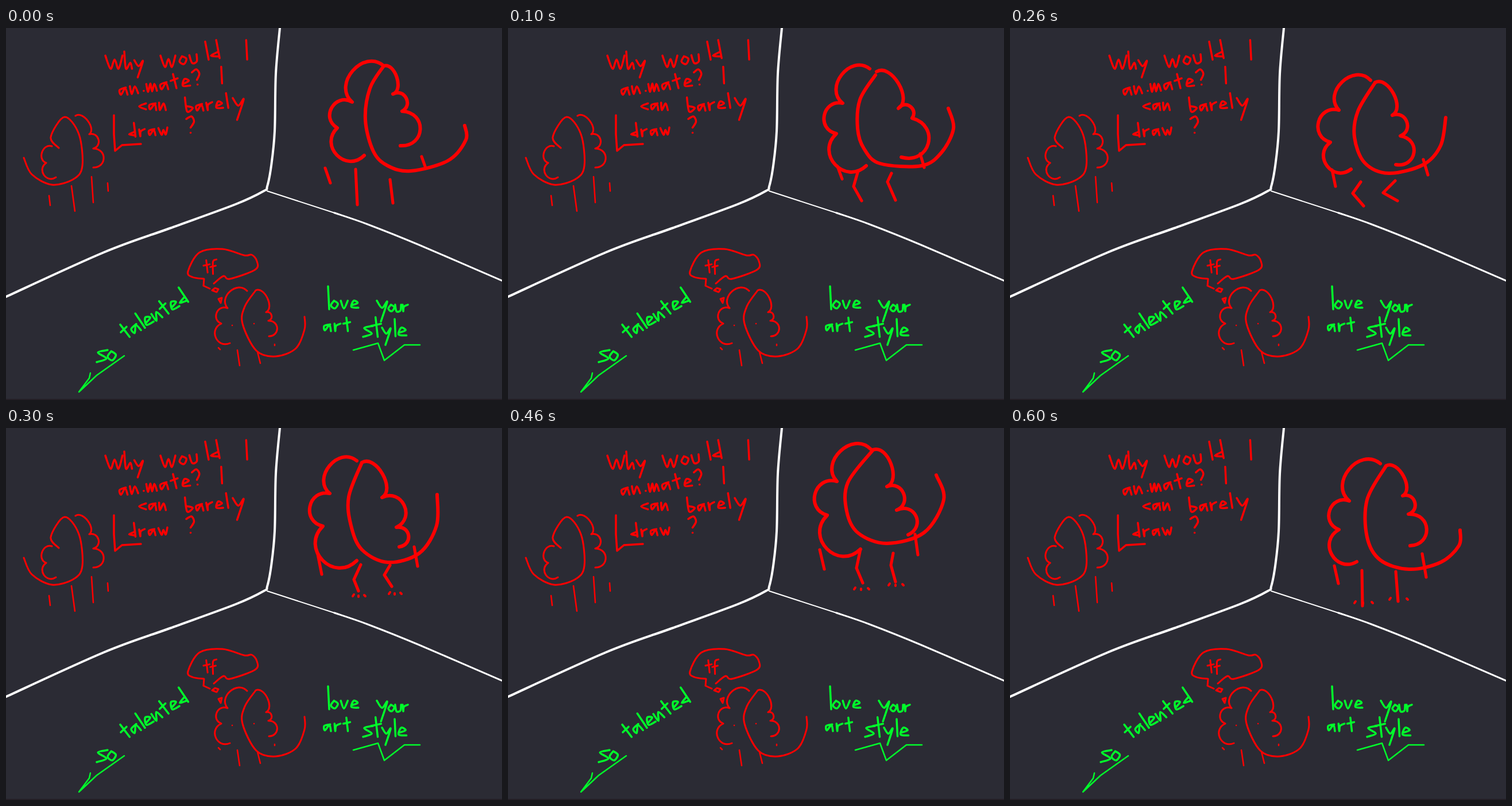
An HTML page for the animation above (0.7 s loop, 864 by 648 pixels).

```html
<!DOCTYPE html>
<html lang="en">
<head>
<meta charset="utf-8">
<title>Why would I animate?</title>
<style>
  html, body { margin: 0; width: 100%; height: 100%; overflow: hidden; background: #2b2b34; }
  svg { display: block; width: 100vw; height: 100vh; }
  path { fill: none; stroke-linecap: round; stroke-linejoin: round; }
</style>
</head>
<body>
<svg id="stage" viewBox="0 0 864 648" role="img"
  aria-label="Why would I animate? I can barely draw? tf. so talented. love your art style"></svg>
<script>
const RED = '#ff0000', GREEN = '#00ff2b', WHITE = '#ffffff';
const STEP = 100;
const stage = document.getElementById('stage');

function add(parent, tag, attrs = {}) {
  const el = document.createElementNS('http://www.w3.org/2000/svg', tag);
  for (const key in attrs) el.setAttribute(key, attrs[key]);
  return parent.appendChild(el);
}

const ink = (color, width, d, parent = stage) =>
  add(parent, 'path', { d, stroke: color, 'stroke-width': width });

const points = text => text.trim().split(/\s+/).map(s => s.split(',').map(Number));

// Smooth curve through all points
function curve(text) {
  const p = points(text);
  if (p.length === 1) return `M${p[0]}h.1`;
  return p.slice(1).reduce((d, b, i) => {
    const a = p[i], before = p[i - 1] || a, after = p[i + 2] || b;
    const c1 = a.map((v, k) => v + (b[k] - before[k]) / 6);
    const c2 = b.map((v, k) => v - (after[k] - a[k]) / 6);
    return d + `C${c1} ${c2} ${b}`;
  }, `M${p[0]}`);
}

// Row of round bumps between cusps; the sign of a bulge picks the side
function bumps(text, bulges) {
  const p = points(text);
  return p.slice(1).reduce((d, b, i) => {
    const a = p[i], k = bulges[i] * 4 / 3;
    const nx = (b[1] - a[1]) * k, ny = (a[0] - b[0]) * k;
    return d + `C${a[0] + nx},${a[1] + ny} ${b[0] + nx},${b[1] + ny} ${b}`;
  }, `M${p[0]}`);
}

// Hand lettering: x-height runs from 0 to 10
const small = {
  a: '9,1 1,3 2,9 8,2 10,10', c: '9,1 0,5 9,9', e: '1,6 9,3 4,0 1,8 10,9', i: '3,8',
  m: '0,0 1,10 5,0 6,10 10,1 12,10', n: '0,0 1,10 6,1 9,10', o: '4,0 0,6 5,10 9,4 4,0',
  r: '1,0 2,10 3,3 9,0', s: '9,0 1,2 8,7 0,10', u: '0,0 2,10 8,9 9,0', v: '0,0 4,10 9,0',
  w: '0,0 4,10 7,3 10,10 13,0'
};
const tall = {
  b: '0,-10 1,9 9,5 2,2', d: '8,3 0,6 8,8 / 8,-10 9,10', f: '9,-9 4,-6 4,12 / 0,2 8,0',
  h: '0,-10 2,10 7,3 9,10', l: '2,-10 3,10', t: '4,-8 6,10 / 0,0 9,-2',
  y: '0,0 5,7 10,1 4,20', '?': '0,-7 6,-10 9,-4 5,3 / 5,9'
};
const glyphs = { ...small, ...tall };

function write(color, width, text, x, y, size, gap = 0, angle = 0) {
  const g = add(stage, 'g', { transform: `translate(${x} ${y}) rotate(${angle}) scale(${size})` });
  let pen = 0;
  for (const ch of text) {
    const strokes = glyphs[ch].split('/');
    const path = ink(color, width / size, strokes.map(curve).join(''), g);
    path.setAttribute('transform', `translate(${pen} 0)`);
    pen += Math.max(...strokes.flatMap(points).map(p => p[0])) + gap / size;
  }
}
const red = (...args) => write(RED, 3.5, ...args);
const green = (...args) => write(GREEN, 3.5, ...args);

function creature(width, oval, left, right, legs, parent = stage) {
  ink(RED, width, curve(oval) + bumps(left, [-.42, -.5, -.5]) + bumps(right, [.3, .5, .55]), parent);
  ink(RED, width * .85, legs, parent);
}

const poses = [];
function pose(...shape) {
  const g = add(stage, 'g');
  creature(6, ...shape, g);
  poses.push(g);
  return g;
}

// Three specks round each foot
function toes(g, feet, spread = 10) {
  for (const [x, y] of points(feet))
    ink(RED, 4, `M${x - spread},${y + 1}l2,-3M${x},${y}v2M${x + spread},${y - 1}l2,2`, g);
}

add(stage, 'rect', { y: 646, width: 864, height: 2, fill: '#241f26' });

// Room corner
ink(WHITE, 4, curve('477,0 470,80 468,180 462,240 455,276 449,284 400,307 285,349 170,391 -2,469'));
ink(WHITE, 2, 'M455,284L572,322');
ink(WHITE, 3, curve('572,322 630,342 720,378 866,441'));

red('w', 173, 48, 2.3);
red('hy', 206, 56, 1.5, 4);
red('w', 269, 48, 2);
red('ou', 301, 50, 1.4, 6, -8);
red('ld', 346, 40, 1.6, 5, -8);
red('l', 415, 38, 1.7);
red('animate?', 196, 104, 1.4, 6, -7.5);
red('l', 372, 82, 1.45);
red('can', 232, 130, 1.3, 5);
red('barel', 313, 134, 1.3, 5, -6);
red('y', 395, 122, 1.9);
red('draw', 214, 178, 1.2, 6, -4);
red('?', 314, 169, 1.5);
ink(RED, 3.5, 'M188,152V185L190,214 202,204 235,202');

creature(3, '92,209 78,190 102,155 127,185 133,240 118,263 80,273 45,255 31,226',
  '80,206 70,235 87,260', '121,153 145,185 152,210 152,243',
  'M75,292l2,17M114,275l6,44M149,259l3,45M177,270l1,14');

// Thought cloud
ink(RED, 3, curve('345,437 325,434 317,424 337,391 377,385 415,396 428,395 437,406 434,421 390,437 379,432 362,445')
  + 'M345,437L344,449 355,454M359,457l5,-4 6,2 -3,5zM370,472l6,-2 -2,9z');
write(RED, 3, 'tf', 344, 414, 1.2, 1);

creature(3, '435,457 416,485 412,515 436,562 470,572 505,558 520,525 520,503',
  '420,458 386,488 375,515 390,549', '435,457 453,495 457,510 458,537',
  'M394,518h.1M432,515h.1M468,551v2M370,557l3,3M403,561l4,27M438,564l5,20');

green('s', 158, 561, 2.1);
green('o', 177, 563, 1.6);
green('talented', 200, 530, 1.5, 3.5, -31);
ink(GREEN, 2.5, 'M206,571L158,605 127,634 145,610 147,601');

green('l', 557, 470, 2);
green('ove', 566, 475, 1.35, 5);
green('y', 646, 475, 1.8);
green('our', 666, 482, 1.15, 1.5);
green('art', 553, 515, 1.3, 5);
green('st', 622, 519, 1.9, -3);
green('yle', 655, 522, 1.5, 4);
ink(GREEN, 2.5, 'M605,561L648,549 659,579 694,552 721,552');

// Jumping character
pose('658,66 634,105 626,160 640,215 665,240 705,249 770,231 801,195 799,170',
  '658,66 603,129 577,174 624,222', '658,66 674,115 690,145 687,205',
  'M556,244L565,270M609,246L612,308M669,264L674,305M724,224L730,241');

pose('640,82 613,125 609,175 620,210 648,236 720,240 755,217 776,175 767,140',
  '630,71 583,131 572,184 624,240', '642,76 680,140 704,157 685,225',
  'M574,241L582,263M609,252L602,276 616,301M668,253L661,268 675,300M718,219L725,243');

pose('636,95 606,145 600,190 618,235 660,253 720,238 750,205 759,156',
  '628,91 573,143 558,199 594,246', '636,95 666,152 680,188 672,238',
  'M561,247L567,276M611,268L597,288 616,310M671,266L650,287 675,301M720,229L728,256');

toes(pose('620,60 597,120 601,170 620,212 665,234 720,218 750,170 751,116',
  '611,57 564,114 552,171 611,231', '620,60 655,121 680,173 685,207',
  'M543,220L550,255M618,238L606,264 614,284M669,239L659,256 672,276M711,207L717,241'),
  '614,292 677,288');

toes(pose('636,38 592,95 590,145 610,183 660,201 725,182 759,125 746,82',
  '632,37 573,93 556,152 614,211', '636,38 660,102 677,143 697,186',
  'M543,212L551,246M614,211L607,244 618,270M671,218L667,239 675,268M709,185L714,221'),
  '615,280 675,273', 12);

toes(pose('630,25 598,75 605,135 635,177 672,191 720,173 755,115 750,62',
  '617,20 571,84 557,133 585,209', '630,25 671,97 682,133 698,162',
  'M545,217L555,246M611,206L617,257M672,208L677,249M708,174L715,212'),
  '618,270 679,265', 9);

toes(pose('655,66 622,125 622,190 645,230 695,246 750,234 782,205 784,178',
  '645,62 591,127 573,177 604,233', '655,66 684,118 694,150 697,205',
  'M565,240L572,271M613,248L614,310M672,250L676,302M718,219L725,260'),
  '615,304 676,298', 15);

const start = performance.now();
function tick() {
  const current = Math.floor((performance.now() - start) / STEP) % poses.length;
  poses.forEach((g, i) => g.setAttribute('display', i === current ? 'inline' : 'none'));
  requestAnimationFrame(tick);
}
tick();
</script>
</body>
</html>
```
